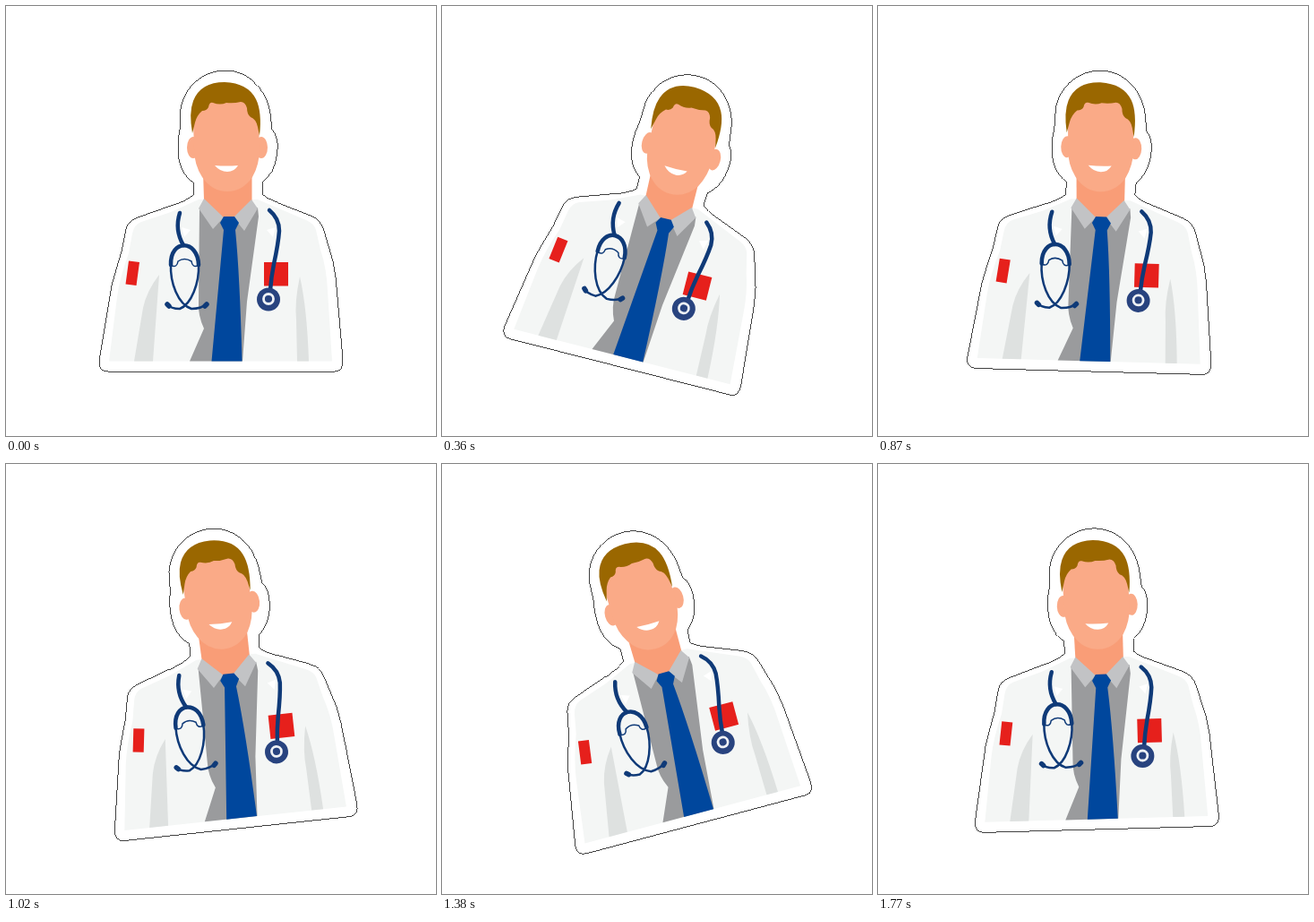
Animation, 480 px wide and 480 px high, one loop 1800 ms. Source, as an HTML page:

```html
<!DOCTYPE html>
<html lang="en">
<head>
<meta charset="utf-8">
<title>Swinging doctor sticker</title>
<style>
  html, body { margin: 0; width: 100%; height: 100%; overflow: hidden; background: #fff; }
  svg { display: block; width: 100%; height: 100%; }
</style>
</head>
<body>
<svg viewBox="0 0 480 480">
  <g id="sticker">
    <!-- A thin stroke without antialiasing gives the broken cut line. -->
    <path id="border" fill="#fff" stroke="#000" stroke-width=".75" shape-rendering="crispEdges"
      d="M245 72C270 72 291 92 295 120L297 138Q304 146 303 160C302 179 295 189 287 196L286 210Q292 216 304 220
         L340 234Q352 239 355 251L365 285Q369 304 370 325L376 394Q377 408 367 408L114 408Q103 408 104 396
         L118 312Q123 293 129 274L134 249Q136 240 147 236L184 223Q199 219 209 211L209 197
         C199 190 193 179 192 163Q191 149 194 138L195 115C199 90 220 72 245 72Z"/>

    <g id="coat">
      <path fill="#f4f6f5" d="M215 216L184 230L151 241Q143 244 141 254L137 276Q127 303 124 325L115 396.5H364L359 318Q358 293 351 272L346 250Q344 243 335 239L281 216Z"/>
      <path fill="#dee1e0" d="M171 300Q157 318 153 337L143 396.5H164ZM328 302Q322 330 324 350L325 396.5H338Q336 337 328 302Z"/>
      <path fill="#fff" d="M196 247L206 250L199 258ZM301 247L291 250L298 258Z"/>
    </g>

    <g id="shirt">
      <path fill="#9a9b9d" d="M216 225L247 234L281 225L282 235L269 330L264 396.5H205L221 360Q214 345 215 330Z"/>
      <path fill="#f99d77" d="M220 184H274.5V217L255 237H243L221 217Z"/>
      <path fill="#c2c3c5" d="M221 215L243 236L231 249L215 226ZM274 216L254 236L266 251L281 226Z"/>
      <path fill="#00479d" d="M243 235H255L260 242L256 250Q261 300 263.5 396.5H229.5L243 250L239 242Z"/>
    </g>

    <g id="head">
      <g fill="#faaa87">
        <ellipse cx="209" cy="158" rx="7" ry="12"/>
        <ellipse cx="285" cy="158" rx="7" ry="12"/>
        <path d="M209 130Q216 102 246 102T282 130L283 160Q283 177 275 191Q264 207 247 207T219 191Q210 177 210 160Z"/>
      </g>
      <path fill="#9a6700" d="M208 142Q204 119 209 106Q217 85 244 85Q270 86 279 104Q286 118 283 145L281 135Q279 126 273 124Q269 121 269 114Q267 107 262 107Q254 109 246 108Q239 111 231 108Q227 107 226 113Q224 117 219 117Q213 122 211 130Z"/>
      <path fill="#fff" d="M233 178Q246 179 259 178Q255 185 247 185T233 178Z"/>
    </g>

    <path fill="#e6201c" d="M137 284.5L149 286L145.5 312L133.5 310.5ZM288 286H315V312.5H288Z"/>

    <g id="stethoscope" fill="none" stroke="#0f3a78" stroke-linecap="round">
      <path stroke-width="4.5" d="M194 231Q188 250 198 267M294 228Q305 237 305 251Q304 265 299 288Q296 303 295 317"/>
      <path stroke-width="4.5" d="M184 289C183 260 214 260 215 289"/>
      <path stroke-width="2.5" d="M184 288C183 309 192 333 207 338Q218 338 223 333M215 288C216 309 207 333 194 338Q184 338 180 333"/>
      <path stroke-width="1.5" d="M185 290Q191 292 192 285Q199 280 207 285Q208 292 214 290"/>
      <path stroke-width="5.5" d="M180 333L182 335M224 333L222 335"/>
      <circle cx="293" cy="327.5" r="13" fill="#28437f" stroke="none"/>
      <circle cx="293" cy="327" r="5.5" stroke="#eef1f5" stroke-width="2.8"/>
    </g>
  </g>
</svg>
<script>
  const PERIOD = 1800, STEP = 30, SWING = 15;
  const sticker = document.getElementById("sticker");

  function draw(ms) {
    const t = Math.floor((ms % PERIOD) / STEP) * STEP;
    const angle = SWING * Math.sin(2 * Math.PI * t / PERIOD);
    sticker.setAttribute("transform", `rotate(${angle} 240 240)`);
  }

  const start = performance.now();
  function tick() {
    draw(performance.now() - start);
    requestAnimationFrame(tick);
  }
  tick();
</script>
</body>
</html>
```
